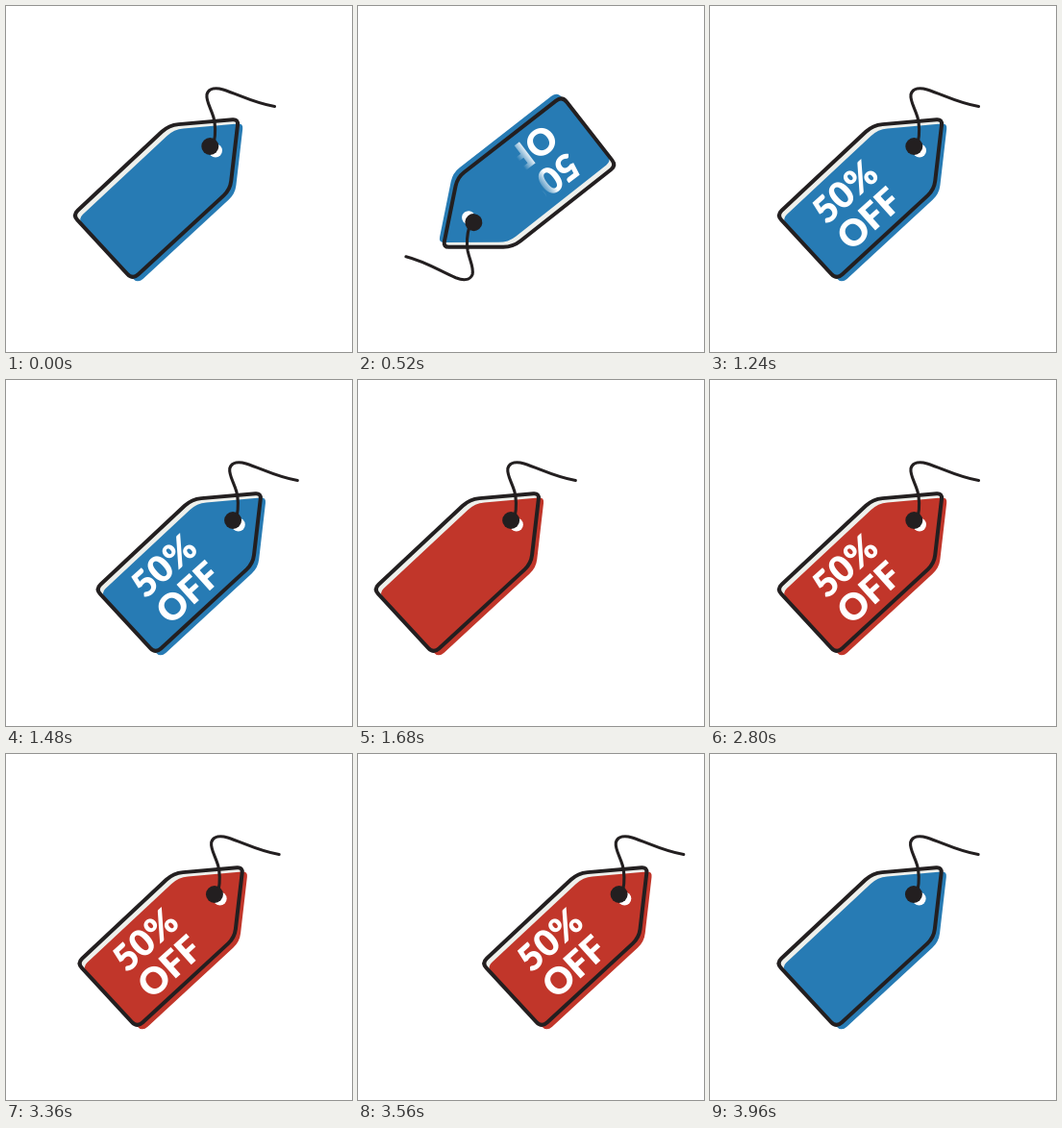
Recreate the animation shown at these times as an HTML page with a canvas. Size 360 px wide and 360 px high, loop 4 s.

```html
<!DOCTYPE html>
<html>
<head>
<meta charset="utf-8">
<style>
html, body { margin: 0; width: 100%; height: 100%; overflow: hidden; background: #fff; }
canvas { display: block; width: 360px; height: 360px; }
</style>
</head>
<body>
<canvas id="stage" width="360" height="360"></canvas>
<script>
const ctx = document.getElementById('stage').getContext('2d');
const INK = '#231f20', BLUE = '#277bb4', RED = '#c1362a';
const PIVOT = [168, 187.5];
const TILT = -42 * Math.PI / 180;

const body = roundedPath([[69.5, 217.5], [169.5, 124], [241.7, 117.7], [233.2, 191], [131.7, 284.7]], [7, 10, 6, 9, 8]);
const thread = new Path2D('M216.5 141 C218 133 218 124 216 116 C213 106 208 99 209 92 C211 85 219 85 226 87 C242 92 258 101 279.5 104.5');

function roundedPath(pts, radii) {
  const path = new Path2D(), n = pts.length;
  const toward = (a, b, r) => {
    const d = Math.hypot(b[0] - a[0], b[1] - a[1]);
    return [a[0] + (b[0] - a[0]) * r / d, a[1] + (b[1] - a[1]) * r / d];
  };
  pts.forEach((p, i) => {
    const start = toward(p, pts[(i + n - 1) % n], radii[i]);
    const end = toward(p, pts[(i + 1) % n], radii[i]);
    if (i) path.lineTo(...start); else path.moveTo(...start);
    path.quadraticCurveTo(...p, ...end);
  });
  path.closePath();
  return path;
}

const progress = (t, start, length) => Math.min(1, Math.max(0, (t - start) / length));

// Symmetric ease in and out: cubic-bezier(a, 0, 1 - a, 1)
function ease(x, a) {
  let lo = 0, hi = 1, s = 0.5;
  for (let i = 0; i < 24; i++) {
    s = (lo + hi) / 2;
    const u = 1 - s;
    if (3 * a * s * u * u + 3 * (1 - a) * s * s * u + s * s * s < x) lo = s; else hi = s;
  }
  return s * s * (3 - 2 * s);
}

function dot(x, y, r, color) {
  ctx.fillStyle = color;
  ctx.beginPath();
  ctx.arc(x, y, r, 0, 7);
  ctx.fill();
}

// Label revealed by a soft-edged wipe along its reading direction
function drawLabel(wipe) {
  if (!wipe) return;
  const left = -65, width = 80, soft = 14;
  const edge = left + (width + soft) * wipe;
  const fade = ctx.createLinearGradient(edge - soft, 0, edge, 0);
  fade.addColorStop(0, '#fff');
  fade.addColorStop(1, 'rgba(255,255,255,0)');
  ctx.save();
  ctx.rotate(TILT);
  ctx.fillStyle = fade;
  ctx.font = '900 38px Lato, sans-serif';
  ctx.textAlign = 'center';
  ctx.fillText('50%', -25, 251);
  ctx.fillText('OFF', -25, 288.7);
  ctx.restore();
}

function drawTag(color, shift, turn, wipe) {
  ctx.save();
  ctx.translate(PIVOT[0] + shift, PIVOT[1]);
  ctx.rotate(turn);
  ctx.translate(-PIVOT[0], -PIVOT[1]);
  ctx.fillStyle = '#eef0ec';
  ctx.fill(body);
  ctx.translate(5.2, 4.4);
  ctx.fillStyle = color;
  ctx.fill(body);
  ctx.translate(-5.2, -4.4);
  dot(218, 150.5, 7, '#fff');
  drawLabel(wipe);
  ctx.strokeStyle = INK;
  ctx.lineCap = ctx.lineJoin = 'round';
  ctx.lineWidth = 4;
  ctx.stroke(body);
  ctx.lineWidth = 3.1;
  ctx.stroke(thread);
  dot(212.3, 146, 9, INK);
  ctx.restore();
}

function draw(now) {
  const time = now % 4000, t = time % 2000;
  const [current, next] = time < 2000 ? [BLUE, RED] : [RED, BLUE];
  const turn = 2 * Math.PI * ease(progress(t, 258, 520), 0.57);
  const wipe = progress(t, 240, 540);
  const slide = 360 * ease(progress(t, 1233, 767), 0.945);
  ctx.fillStyle = '#fff';
  ctx.fillRect(0, 0, 360, 360);
  drawTag(current, slide, turn, wipe);
  if (t > 1233) drawTag(next, slide - 360, 0, 0);
}

const begin = performance.now();
function frame() {
  draw(performance.now() - begin);
  requestAnimationFrame(frame);
}
frame();
</script>
</body>
</html>
```
